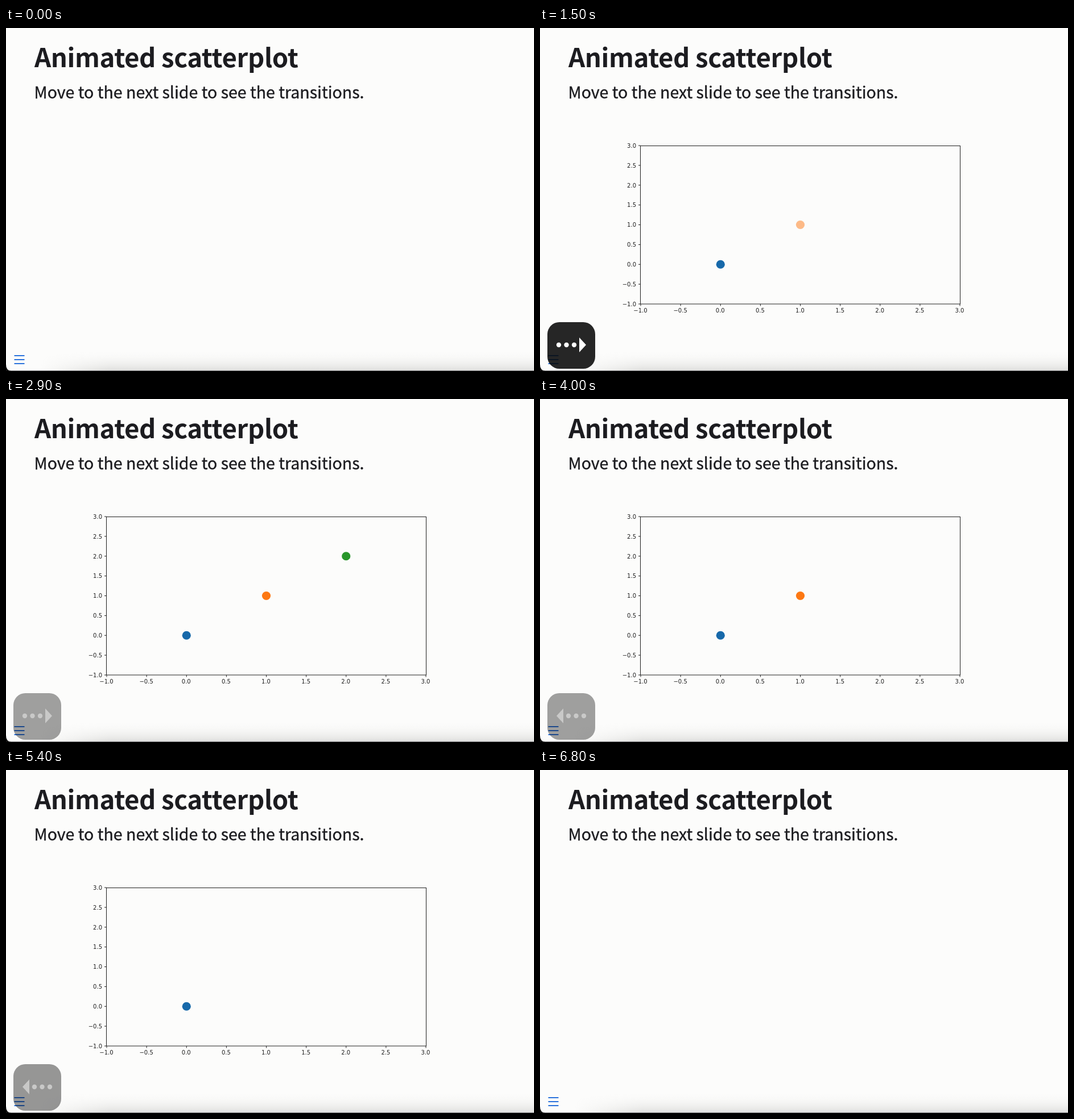
These frames come from a looping animation (928 by 604 pixels, 7000 ms). An HTML page with a canvas:

```html
<!DOCTYPE html>
<html lang="en">
<head>
<meta charset="utf-8">
<title>Animated scatterplot</title>
<style>
  html, body { margin: 0; width: 100%; height: 100%; overflow: hidden; background: #fcfcfb; }
  canvas { display: block; }
</style>
</head>
<body>
<canvas id="stage" width="928" height="604"></canvas>
<script>
const ctx = document.getElementById('stage').getContext('2d');
const LOOP = 7000, STEP = 100;
const SANS = '"Noto Sans CJK SC", "Noto Sans CJK JP", "Noto Sans CJK", "Open Sans", sans-serif';

// Key presses: when, and direction (1 = next, -1 = back)
const presses = [[700, 1], [1441, 1], [2050, 1], [3150, -1], [4560, -1], [5600, -1]];
// Each point lives between the press that shows it and the one that hides it
const points = [
  { value: 0, color: '#1769aa', on: 700, off: 5600 },
  { value: 1, color: '#fd7813', on: 1441, off: 4560 },
  { value: 2, color: '#28962a', on: 2050, off: 3150 }
];

const clamp = v => Math.min(1, Math.max(0, v));
const ease = age => 1 - (1 - clamp(age / 200)) ** 2;
const visibility = (t, { on, off }) => ease(t - on) * (1 - ease(t - off));
const plotX = v => 177 + (v + 1) * 140.25;
const plotY = v => 486 - (v + 1) * 69.75;

function text(str, x, y, font, align = 'left', spacing = 0) {
  ctx.font = font;
  ctx.textAlign = align;
  ctx.letterSpacing = spacing + 'px';
  ctx.fillText(str, x, y);
}

function line(x1, y1, x2, y2) {
  ctx.beginPath();
  ctx.moveTo(x1, y1);
  ctx.lineTo(x2, y2);
  ctx.stroke();
}

function disc(x, y, r) {
  ctx.beginPath();
  ctx.arc(x, y, r, 0, 7);
  ctx.fill();
}

function drawWindowEdge() {
  // Soft shadow along the bottom, fading out to the left
  for (let y = 566; y < 603; y++) {
    const depth = ((y - 566) / 37) ** 2;
    const shade = ctx.createLinearGradient(60, 0, 180, 0);
    shade.addColorStop(0, 'rgba(110,110,105,0)');
    shade.addColorStop(1, `rgba(110,110,105,${0.2 * depth})`);
    ctx.fillStyle = shade;
    ctx.fillRect(60, y, 868, 1);
  }
  ctx.fillStyle = '#77777a';
  ctx.fillRect(0, 603, 928, 1);
  ctx.fillStyle = '#111';
  ctx.beginPath();
  ctx.moveTo(0, 592);
  ctx.quadraticCurveTo(0, 603, 9, 604);
  ctx.lineTo(0, 604);
  ctx.fill();
}

function drawSlide() {
  ctx.fillStyle = '#fcfcfb';
  ctx.fillRect(0, 0, 928, 604);
  drawWindowEdge();
  ctx.fillStyle = ctx.strokeStyle = '#1c1c20';
  text('Animated scatterplot', 50, 69, `bold 45.5px ${SANS}`, 'left', -0.38);
  const hint = 'Move to the next slide to see the transitions.';
  text(hint, 49.5, 123.5, `28.52px ${SANS}`);
  // A hairline outline gives the text a slightly heavier weight
  ctx.lineWidth = 0.4;
  ctx.strokeText(hint, 49.5, 123.5);
  ctx.strokeStyle = '#2a72dc';
  ctx.lineWidth = 2;
  for (const y of [577, 584, 591]) line(14.5, y, 32.5, y);
}

function drawAxes() {
  const font = '10px "DejaVu Sans", sans-serif';
  ctx.strokeStyle = ctx.fillStyle = '#1e1e1e';
  ctx.lineWidth = 1;
  ctx.strokeRect(176.5, 207.5, 562, 278.5);
  for (let v = -1; v <= 3; v += 0.5) {
    const x = plotX(v), y = plotY(v), label = v.toFixed(1).replace('-', '−');
    line(x, 486, x, 489.5);
    line(173, y, 176.5, y);
    text(label, x - 0.5, 501.3, font, 'center');
    text(label, 169, y + 3.8, font, 'right');
  }
}

function drawPlot(t) {
  ctx.globalAlpha = visibility(t, points[0]);
  if (ctx.globalAlpha) drawAxes();
  for (const p of points) {
    ctx.globalAlpha = visibility(t, p);
    ctx.fillStyle = p.color;
    disc(plotX(p.value), plotY(p.value), 7.6);
  }
  ctx.globalAlpha = 1;
}

function drawKey(t) {
  const press = presses.findLast(([at]) => at <= t);
  if (!press) return;
  const [at, dir] = press;
  const alpha = 1 - clamp((t - at - 710) / 250);
  if (!alpha) return;
  ctx.save();
  ctx.globalAlpha = alpha;
  ctx.fillStyle = 'rgba(8,8,8,.87)';
  ctx.beginPath();
  ctx.roundRect(13, 518, 84, 82, 21);
  ctx.fill();
  ctx.translate(55, 558);
  ctx.scale(dir, 1);
  ctx.fillStyle = '#fff';
  for (const x of [-22, -8.5, 5]) disc(x, 0, 4.2);
  ctx.beginPath();
  ctx.moveTo(14, -13);
  ctx.lineTo(26, 0);
  ctx.lineTo(14, 13);
  ctx.fill();
  ctx.restore();
}

function render(now) {
  const t = Math.floor((now % LOOP) / STEP) * STEP;
  drawSlide();
  drawPlot(t);
  drawKey(t);
  requestAnimationFrame(render);
}
requestAnimationFrame(render);
</script>
</body>
</html>
```
